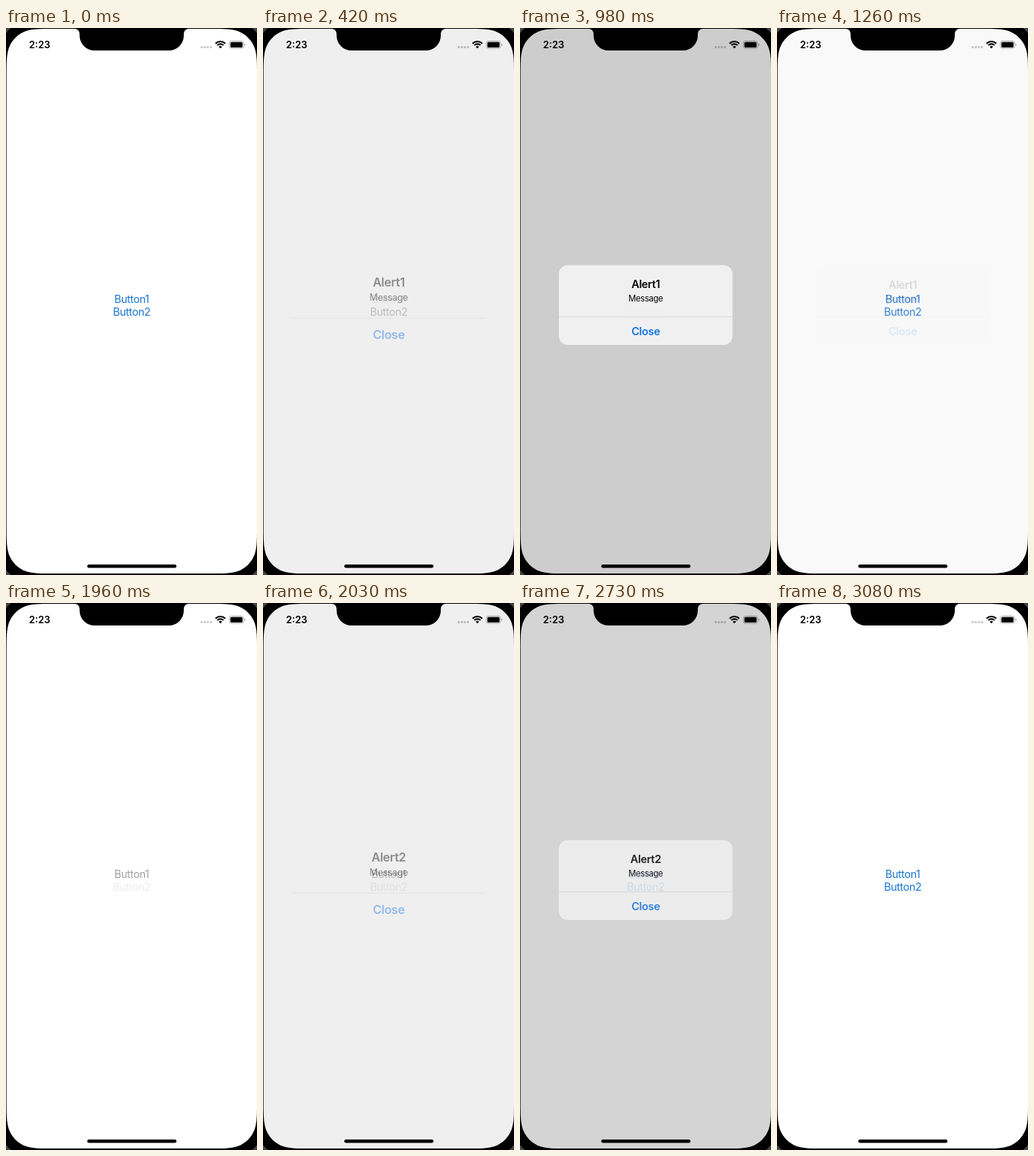
An HTML page for the animation above (3150 ms loop, 336 by 730 pixels).

```html
<!DOCTYPE html>
<html lang="en">
<head>
<meta charset="utf-8">
<title>Two alerts</title>
<style>
  html, body { margin: 0; height: 100%; overflow: hidden; background: #444; }
  svg { display: block; width: 336px; height: 730px; }
  text { font-family: Inter, Roboto, sans-serif; text-anchor: middle; }
  .button { font-size: 14.3px; letter-spacing: -.4px; }
  .bold { font-size: 14.5px; font-weight: 600; letter-spacing: -.33px; }
  .message { font-size: 11.2px; letter-spacing: -.3px; }
  .time { font-size: 13px; font-weight: 600; }
</style>
</head>
<body>
<svg viewBox="0 0 336 730">
  <rect x="-14" y="-14" width="364" height="758" rx="59"/>
  <path id="screen" fill="#fff"/>

  <text class="time" x="45" y="27">2:23</text>
  <g fill="#c4c4c4">
    <circle cx="262" cy="25.5" r="1.5"/><circle cx="266.1" cy="25.5" r="1.5"/>
    <circle cx="270.2" cy="25.5" r="1.5"/><circle cx="274.3" cy="25.5" r="1.5"/>
  </g>
  <g fill="none" stroke="#000" stroke-width="2.1">
    <path d="M280.5 20.7a9.2 9.2 0 0 1 13 0M282.9 23.1a5.8 5.8 0 0 1 8.2 0"/>
    <path d="M287 27.2l-2.2-2.2a3.1 3.1 0 0 1 4.4 0z" fill="#000" stroke="none"/>
  </g>
  <rect x="299" y="17.4" width="19" height="9.8" rx="2.8" fill="none" stroke="#a6a6a6" stroke-width=".9"/>
  <rect x="300.4" y="18.7" width="16.2" height="7.2" rx="1.5"/>
  <path d="M319.3 20.6q1.3.4 1.3 1.7t-1.3 1.7z" fill="#a6a6a6"/>

  <g id="buttons">
    <text class="button" x="168.3" y="367">Button1</text>
    <text class="button" x="168.3" y="384.3">Button2</text>
  </g>

  <rect x="108.8" y="716" width="119.4" height="4.6" rx="2.3"/>
  <path id="dim"/>
  <path d="M92 0V1A6.5 6.5 0 0 1 98.5 7.5V10A20 20 0 0 0 118.5 30H218A20 20 0 0 0 238 10V7.5A6.5 6.5 0 0 1 244.5 1V0Z"/>

  <g id="alert">
    <rect x="52" y="316.5" width="232.5" height="106.6" rx="12" fill="#f1f1f1"/>
    <path d="M52 385.4H284.5" stroke="#d6d6d6" stroke-width=".9"/>
    <text id="title" class="bold" x="168.3" y="347.5">Alert1</text>
    <text class="message" x="168.3" y="365">Message</text>
    <text class="bold" x="168.3" y="410" fill="#1474e4">Close</text>
  </g>
</svg>
<script>
const LOOP = 3150, STEP = 70;
const rounds = [
  { open: 350, close: 947 },
  { open: 1960, close: 2630 }
];
const $ = id => document.getElementById(id);
const labels = [...$('buttons').children];
const clamp = x => Math.min(1, Math.max(0, x));
const smooth = x => (x = clamp(x), x * x * (3 - 2 * x));
const spring = x => 1 - (1 + x) * Math.exp(-x);

// Rounded box whose corners ease into the straight sides
function softBox(left, top, right, bottom, r) {
  const half = [[1.529, 0], [1.088, 0], [.868, 0], [.631, .075], [.373, .169]];
  const curve = [...half, ...half.map(([x, y]) => [y, x]).reverse()];
  const corner = (x, y, sx, sy, flip) => {
    const points = curve.map(([a, b]) => [x + sx * a * r, y + sy * b * r]);
    return (flip ? points.reverse() : points).join(' ').replace(' ', 'C');
  };
  return 'M' + [
    corner(left, top, 1, 1, true), corner(right, top, -1, 1, false),
    corner(right, bottom, -1, -1, true), corner(left, bottom, 1, -1, false)
  ].join('L') + 'Z';
}

const outline = softBox(.7, 1, 336, 728, 41);
$('screen').setAttribute('d', outline);
$('dim').setAttribute('d', outline);

function draw(t) {
  const n = t < rounds[1].open ? 0 : 1;
  const { open, close } = rounds[n];
  const age = Math.max(0, t - open - 6);
  const left = 1 - smooth((t - close) / 400);
  const scale = 1.2 - 0.2 * spring(0.0222 * age);

  $('dim').setAttribute('opacity', 0.2 * smooth(age / 172) * left);
  $('alert').setAttribute('opacity', clamp(age / 155) * left);
  $('alert').setAttribute('transform',
    `translate(168.3 369.8) scale(${scale}) translate(-168.3 -369.8)`);
  $('title').textContent = 'Alert' + (n + 1);

  // The tapped button fades, and both lose their tint while the alert is up
  const active = t >= open && t < close;
  $('buttons').setAttribute('fill', active ? '#a0a0a0' : '#1b76d2');
  labels.forEach((label, i) => label.setAttribute('opacity',
    active && i === n ? 0.2 + 0.8 * clamp((t - open - 60) / 80) : 1));
}

const begin = performance.now();
function tick() {
  const t = (performance.now() - begin) % LOOP;
  draw(Math.floor(t / STEP) * STEP);
  requestAnimationFrame(tick);
}
tick();
</script>
</body>
</html>
```
